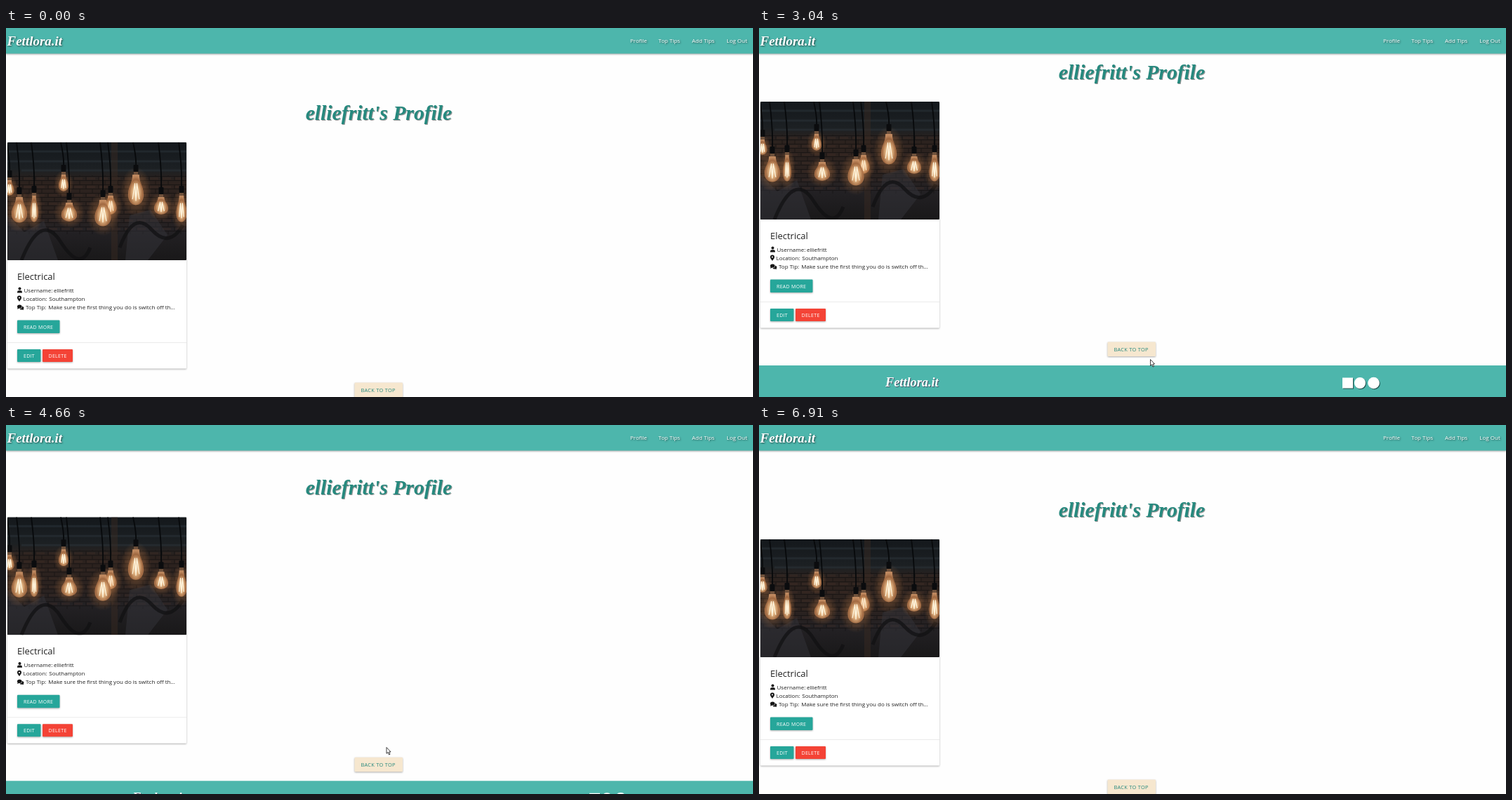
Write an HTML page that moves like this. It is 1064 px wide and 526 px high and loops after 7390 ms.

```html
<!DOCTYPE html>
<html lang="en">
<head>
<meta charset="utf-8">
<title>Profile page</title>
<style>
  html, body { margin: 0; width: 100%; height: 100%; overflow: hidden; background: #fefefe; }
  svg { display: block; width: 1064px; height: 526px; }
  text { font: 8px "Open Sans", "Noto Sans", sans-serif; fill: #212121; white-space: pre; }
  .b { font-weight: 500; }
  .script { font: italic 700 19px "Liberation Serif", serif; fill: #fff; filter: drop-shadow(1.2px 1.2px .6px #456); }
  .title { font-size: 29.7px; fill: #26897e; text-anchor: middle; filter: drop-shadow(1.6px 1.6px .6px #999); }
  .nav text { fill: #fff; font-weight: 500; filter: drop-shadow(1px 1px .8px rgba(0,0,0,.6)); }
  .btn text { font-size: 7px; letter-spacing: .3px; fill: #fff; font-weight: 500; }
  .btn rect, .card { filter: drop-shadow(0 1px 1px rgba(0,0,0,.32)); }
  .btn .top { font-size: 7.4px; fill: #26897e; }
  .social { fill: #fff; filter: drop-shadow(1.2px 1.2px .7px rgba(0,0,0,.55)); }
  .cursor { fill: #fff; stroke: #111; stroke-width: .8; stroke-linejoin: round; }
</style>
</head>
<body>
<svg viewBox="0 0 1064 526">
  <defs>
    <linearGradient id="wall" x2="0" y2="1">
      <stop offset="0" stop-color="#14181c"/>
      <stop offset=".22" stop-color="#1c2023"/>
      <stop offset=".34" stop-color="#2c221e"/>
      <stop offset=".6" stop-color="#2b221f"/>
      <stop offset=".75" stop-color="#232124"/>
      <stop offset="1" stop-color="#191819"/>
    </linearGradient>
    <radialGradient id="glass" cy=".6" r=".55">
      <stop offset="0" stop-color="#ffeccb"/>
      <stop offset=".4" stop-color="#e9b985"/>
      <stop offset=".8" stop-color="#a56b42"/>
      <stop offset="1" stop-color="#c99064"/>
    </radialGradient>
    <radialGradient id="halo">
      <stop offset="0" stop-color="#e89450" stop-opacity=".5"/>
      <stop offset="1" stop-color="#e89450" stop-opacity="0"/>
    </radialGradient>
    <pattern id="bricks" width="18" height="12" patternUnits="userSpaceOnUse">
      <path d="M0 .5H18M0 6.5H18M4 0V6M13 6V12" stroke="#120f0f" fill="none"/>
      <path d="M5 2H17V5H5Z" fill="#4a3228" opacity=".4"/>
    </pattern>
    <clipPath id="photoClip"><rect width="255" height="168" rx="1"/></clipPath>
  </defs>

  <g id="page">
    <text class="script title" x="531" y="131">elliefritt's Profile</text>

    <rect class="card" x="2" y="163" width="255" height="322.5" rx="1" fill="#fff"/>
    <g transform="translate(2 163)" clip-path="url(#photoClip)">
      <rect width="255" height="168" fill="url(#wall)"/>
      <rect y="47" width="255" height="84" fill="url(#bricks)" opacity=".65"/>
      <path d="M0 13H255M0 27H255M20 40H255" stroke="#293137" stroke-width="3" opacity=".6"/>
      <rect x="148" width="9" height="168" fill="#3a2a23" opacity=".45"/>
      <path d="M0 104L24 128L52 112L72 168H0ZM174 104L204 96L228 132L200 168H168Z" fill="#35353a" opacity=".5"/>
      <path d="M20 168Q48 98 76 142T118 150M160 150Q180 96 205 124T250 118" fill="none" stroke="#101012" stroke-width="5" opacity=".7"/>
      <g id="bulbs"></g>
    </g>

    <text class="b" x="16" y="359" style="font-size:13px">Electrical</text>
    <g fill="#151515">
      <circle cx="19.5" cy="371.6" r="2"/>
      <path d="M16 377.5V376.5Q16 374.2 18.3 374.2H20.8Q23 374.2 23 376.5V377.5Z"/>
      <path fill-rule="evenodd" d="M19 390C17.8 388 16 386.4 16 384.5A3 3 0 0 1 22 384.5C22 386.4 20.2 388 19 390ZM20.1 384.5A1.1 1.1 0 1 0 17.9 384.5A1.1 1.1 0 1 0 20.1 384.5Z"/>
      <ellipse cx="19.3" cy="397" rx="3.3" ry="2.6"/>
      <path d="M16 400.8L17 398L19 399.4ZM23 396.8C25.8 397.2 26 400 24.7 400.7L25.3 402L23 401.4C21.3 401.8 19.8 401.2 19.5 400.2C21.5 400.2 23.4 399 23 396.8Z"/>
    </g>
    <text class="b" x="25.5" y="376.5">Username:</text><text x="68" y="376.5">elliefritt</text>
    <text class="b" x="24.5" y="389">Location:</text><text x="61.3" y="389">Southampton</text>
    <text class="b" x="28" y="401">Top Tip:</text><text x="60.3" y="401">Make sure the first thing you do is switch off th...</text>
    <path d="M2 448.5H257" stroke="#e6e6e6" stroke-width=".8"/>

    <g class="btn">
      <rect x="16" y="416.5" width="60.5" height="18.5" rx="1" fill="#26a69a"/><text x="25" y="428.8">READ MORE</text>
      <rect x="16" y="458" width="33.5" height="18" rx="1" fill="#26a69a"/><text x="25" y="469.8">EDIT</text>
      <rect x="52" y="458" width="43" height="18" rx="1" fill="#f44336"/><text x="60.5" y="469.8">DELETE</text>
      <rect id="topBtn" x="496.5" y="505.5" width="68.5" height="20.5" rx="1"/><text class="top" x="505.5" y="518.6">BACK TO TOP</text>
    </g>

    <rect y="539" width="1064" height="60" fill="#4db6ac"/>
    <text class="script" x="180" y="569" style="font-size:18.3px">Fettlora.it</text>
    <g class="social">
      <rect x="831" y="556.5" width="15" height="15"/>
      <circle cx="856" cy="564" r="8"/>
      <circle cx="875.5" cy="564" r="8.3"/>
    </g>
  </g>

  <g class="nav">
    <rect width="1064" height="36.5" fill="#4db6ac" style="filter:drop-shadow(0 1px 1px rgba(0,0,0,.35))"/>
    <text class="script" x="1.5" y="24.5" style="font:italic 700 19px 'Liberation Serif',serif">Fettlora.it</text>
    <text x="889" y="21">Profile</text>
    <text x="929.3" y="21">Top Tips</text>
    <text x="977" y="21">Add Tips</text>
    <text x="1026.3" y="21">Log Out</text>
  </g>

  <g id="cursor" class="cursor">
    <path id="arrow" d="M.5 .5V9.3L2.5 7.5L4 11L5.5 10.3L4 7H6.6Z"/>
    <path id="hand" d="M-.6 7.5V.9Q.4-.4 1.4 .9V4.6Q2.5 3.8 3.2 4.9Q4.4 4.2 4.9 5.4Q6.4 5 6.4 6.6V9.4Q6 11 5.2 13H.6Q-.5 10.6-2.4 8.6Q-2.8 6.6-.6 7.5Z"/>
  </g>
</svg>

<script>
const LOOP = 7390;
const $ = id => document.getElementById(id);
const clamp = v => Math.min(1, Math.max(0, v));

// Hanging bulbs: x, top of glass, width, height
const bulbs = [
  [3, 54, 13, 22], [17, 78, 22, 37], [38, 76, 12, 38], [80, 46, 14, 24],
  [88, 86, 22, 27], [147, 76, 17, 27], [136, 82, 23, 38], [183, 46, 22, 44],
  [219, 78, 20, 25], [248, 76, 15, 38]
];
$('bulbs').innerHTML = bulbs.map(([x, y, w, h]) => {
  const n = w * .22, r = w / 2;
  return `<path d="M${x - 4} 0Q${x + 1} ${y / 2} ${x} ${y - 12}" fill="none" stroke="#07090b" stroke-width="1.8"/>
    <ellipse cx="${x}" cy="${y + h * .55}" rx="${w}" ry="${h * .8}" fill="url(#halo)"/>
    <rect x="${x - 3.5}" y="${y - 14}" width="7" height="10" rx="1" fill="#0b0c0e"/>
    <rect x="${x - 3}" y="${y - 4}" width="6" height="5" fill="#70523c"/>
    <path d="M${x - n} ${y}C${x - n} ${y + h * .3} ${x - r} ${y + h * .35} ${x - r} ${y + h * .65}
      C${x - r} ${y + h * 1.1} ${x + r} ${y + h * 1.1} ${x + r} ${y + h * .65}
      C${x + r} ${y + h * .35} ${x + n} ${y + h * .3} ${x + n} ${y}Z" fill="url(#glass)" opacity=".92"/>
    <path d="M${x - n} ${y + h * .8}L${x - 1.4} ${y + h * .28}L${x} ${y + h * .85}L${x + 1.4} ${y + h * .28}L${x + n} ${y + h * .8}"
      fill="none" stroke="#fff6df" stroke-width="1.2"/>`;
}).join('');

// Pointer moves: start, end, steps, evenly timed points
const moves = [
  [400, 1090, 11, [[990, 493], [955, 455], [900, 395], [845, 360], [813, 350]]],
  [2450, 2450, 1, [[813, 351]]],
  [2640, 3310, 11, [[800, 361], [720, 430], [625, 486], [557, 472], [545, 463], [541, 460]]],
  [3400, 3400, 1, [[541.5, 459]]],
  [5650, 6350, 11, [[540, 457], [556, 448], [640, 452], [775, 468], [900, 484], [967, 490]]],
  [6420, 6910, 8, [[975, 494], [1000, 506], [1020, 517], [1034, 524], [1034, 540]]]
];

function pointer(t) {
  const move = moves.filter(m => t >= m[0]).pop();
  if (!move || t >= 6910) return null;
  const [start, end, steps, pts] = move;
  const u = end > start ? clamp(Math.floor((t - start) / (end - start) * (steps - 1) + .2) / (steps - 1)) : 0;
  const at = u * (pts.length - 1), i = Math.floor(at), f = at - i;
  const a = pts[i], b = pts[i + 1] || a;
  return a.map((v, k) => v + (b[k] - v) * f);
}

function scrollAt(t) {
  if (t < 1640) return 0;
  if (t < 1850) return [22, 47, 56][Math.floor((t - 1640) / 70)];
  const tick = 4390 + Math.floor((t - 4388) / 66.6) * 66.6;
  const p = clamp((tick - 4205) / 960);
  return 29 * (1 + Math.cos(Math.PI * p));
}

function draw(t) {
  const y = scrollAt(t), pos = pointer(t);
  $('page').setAttribute('transform', `translate(0 ${-y})`);

  const hover = clamp((t - 3110) / 200) - clamp((t - 4520) / 130);
  const mix = (a, b) => Math.round(a + (b - a) * hover);
  $('topBtn').setAttribute('fill', `rgb(${mix(246, 244)},${mix(231, 244)},${mix(207, 244)})`);

  $('cursor').style.display = pos ? '' : 'none';
  if (!pos) return;
  const top = 505.5 - y;
  const over = pos[0] > 496 && pos[0] < 565 && pos[1] > top && pos[1] < top + 20.5;
  $('cursor').setAttribute('transform', `translate(${pos})`);
  $('arrow').style.display = over ? 'none' : '';
  $('hand').style.display = over ? '' : 'none';
}

const begin = performance.now();
function tick() {
  draw((performance.now() - begin) % LOOP);
  requestAnimationFrame(tick);
}
tick();
</script>
</body>
</html>
```
